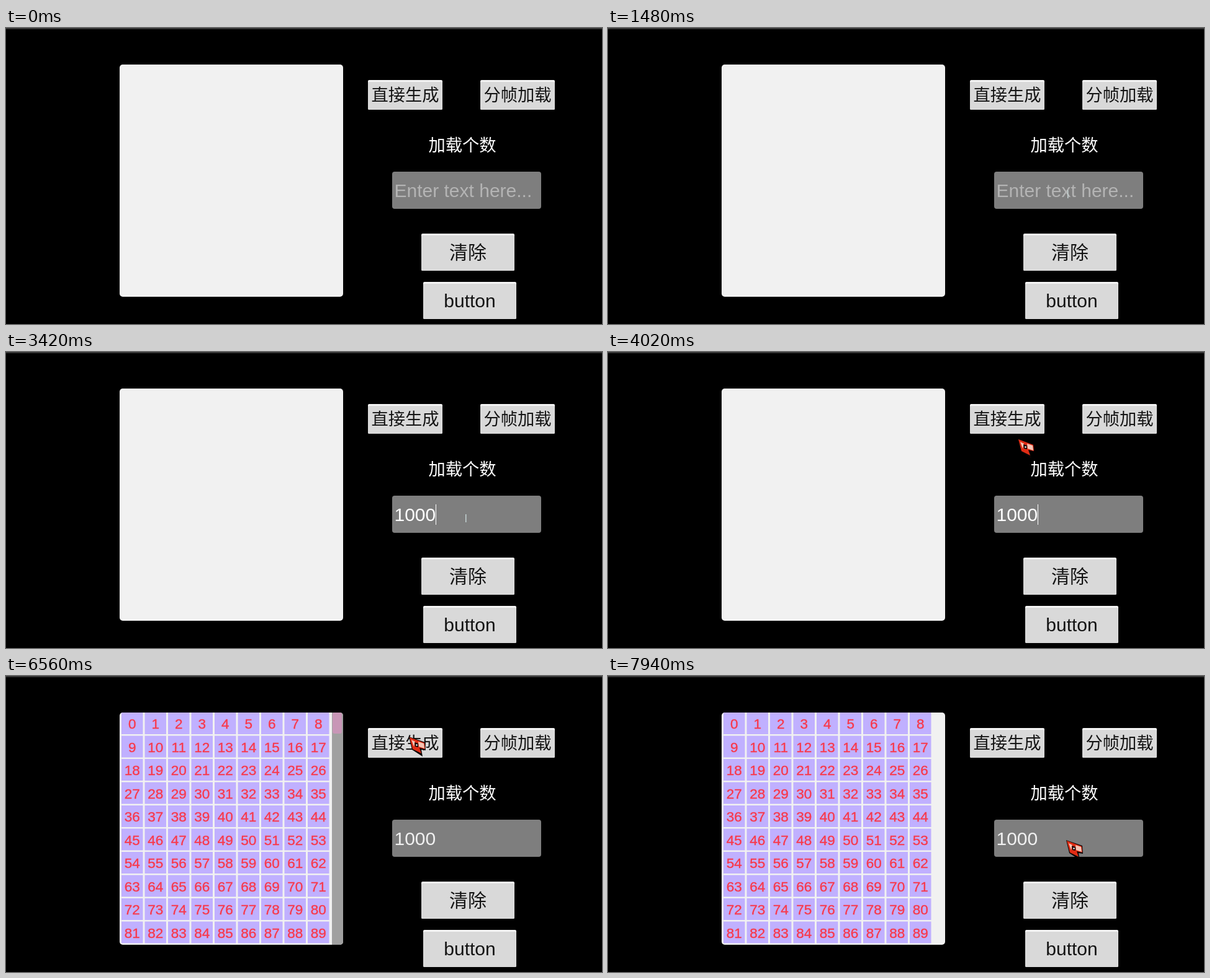
Animation of 960 by 478 pixels, one loop 8000 ms. Source, as an HTML page:

```html
<!DOCTYPE html>
<html lang="zh">
<head>
<meta charset="utf-8">
<title>List loading</title>
<style>
  html, body { margin: 0; width: 100%; height: 100%; overflow: hidden; background: #000; }
  svg { display: block; width: 960px; height: 478px; }
  text { font: 30px "Liberation Sans", Arial, sans-serif; fill: #141414; }
  .mid { text-anchor: middle; }
  .cjk { font-family: "Noto Sans CJK SC", "Noto Sans CJK", sans-serif; }
  .face { fill: #d9d9d9; }
  .shine { fill: #f4f4f4; }
  .pressed .face { fill: #505050; }
  .pressed .shine { fill: #5a5a5a; }
  .pressed text { fill: #0c0c0c; }
  #grid rect { fill: #c0b0ff; }
  #grid text { font-size: 22.5px; fill: #f83a4c; stroke: #f83a4c; stroke-width: .4px; }
</style>
</head>
<body>
<svg viewBox="0 0 960 478">
  <defs>
    <clipPath id="round"><rect x="183" y="59" width="360" height="375" rx="5"/></clipPath>
  </defs>
  <rect width="960" height="478"/>
  <rect width="960" height="2" fill="#343434"/>

  <g clip-path="url(#round)">
    <rect x="183" y="59" width="360" height="375" fill="#f1f1f1"/>
    <g id="grid"></g>
    <g id="bar">
      <rect x="525" y="59" width="18" height="375" fill="#a0a0a0"/>
      <rect x="526" y="59" width="15" height="34" rx="3" fill="#c896b6"/>
    </g>
  </g>

  <g id="buttons"></g>
  <text class="mid cjk" x="735" y="199" style="fill:#fff;font-size:27.3px">加载个数</text>

  <rect x="622" y="232" width="240" height="60" rx="4" fill="#7e7e7e"/>
  <text id="value" x="625.5" y="272.5"></text>
  <rect id="caret" y="246" width="1" height="33" fill="#fff"/>
  <rect id="beam" x="740" y="262" width="1.5" height="13" fill="#c4d2d2"/>

  <g id="cursor">
    <path d="M0 0L26 9L27 22L20 21L22 32L5 21Z" fill="#080404"/>
    <path d="M1 1L25 10L26 20L17 18L20 27L6 20Z" fill="#e02c14"/>
    <path d="M4 5L10 8L8 16Z M15 8L24 11L25 19L16 16Z" fill="#f6c4b4"/>
    <path d="M9 9L15 11L15 17L10 16Z" fill="#140808"/>
    <circle cx="12.5" cy="13.5" r="1.3" fill="#fff"/>
  </g>
</svg>
<script>
const LOOP = 8000;
const TICK = 68;
const FOCUS = 950, LEAVE = 3960, PRESS = 4490, FILL = 6560;
const BLINK = 533;
const SVG = "http://www.w3.org/2000/svg";
const $ = id => document.getElementById(id);

function add(parent, tag, attrs, label = "") {
  const node = document.createElementNS(SVG, tag);
  for (const key in attrs) node.setAttribute(key, attrs[key]);
  node.textContent = label;
  return parent.appendChild(node);
}

function button(x, y, width, height, label, size, font = "cjk") {
  const g = add($("buttons"), "g", {});
  add(g, "rect", { x, y, width, height, rx: 2, class: "shine" });
  add(g, "rect", { x, y: y + 3, width, height: height - 3, rx: 2, class: "face" });
  add(g, "text", {
    x: x + width / 2, y: y + height / 2 + size * .36,
    class: "mid " + font, style: `font-size:${size}px`
  }, label);
  return g;
}

const generate = button(583, 84, 120, 48, "直接生成", 27.3);
button(764, 84, 120, 48, "分帧加载", 27.3);
button(669, 332, 150, 60, "清除", 30);
button(672, 410, 150, 60, "button", 30, "latin");

for (let i = 0; i < 90; i++) {
  const x = 186 + i % 9 * 37.5, y = 59 + Math.floor(i / 9) * 37.5;
  add($("grid"), "rect", { x, y, width: 34.5, height: 35 });
  add($("grid"), "text", { x: x + 17.3, y: y + 26, class: "mid" }, i);
}

const moves = [
  { start: 130, end: 880, from: [940, 512], to: [740, 266] },
  { start: LEAVE, end: 4290, from: [667, 165], to: [649, 98] },
  { start: 7260, end: 7940, from: [649, 98], to: [738, 265] }
];

// Time of each key press and the text it leaves
const typing = [[1680, "1"], [2360, "100"], [3020, "1000"]];

const within = (t, a, b) => t >= a && t < b;
const show = (id, on) => $(id).style.display = on ? "" : "none";
const easeOut = p => 1 - (1 - p) ** 2;
const progress = (t, a, b) => Math.min(1, Math.max(0, (t - a) / (b - a)));

function pointer(t) {
  const move = moves.findLast(m => t >= m.start);
  const typingNow = within(t, FOCUS, LEAVE);
  show("cursor", move && !typingNow);
  show("beam", typingNow);
  if (!move) return;
  const { start, end, from, to } = move;
  // The pointer is redrawn once per tick; the final pose is always reached
  const held = t >= end ? end : start + Math.floor((t - start + 8) / TICK) * TICK;
  const p = easeOut(progress(held, start, end));
  const [x, y] = from.map((v, i) => Math.round(v + (to[i] - v) * p));
  $("cursor").setAttribute("transform", `translate(${x} ${y})`);
}

function input(t) {
  const typed = typing.reduce((s, [at, v]) => t >= at ? v : s, "");
  const lit = Math.floor((PRESS - t) / BLINK) % 2 === 0;
  $("value").textContent = typed || "Enter text here...";
  $("value").style.fill = !typed ? "#b4b4b4" : t < PRESS ? "#fff" : "#f0f0f0";
  show("caret", within(t, FOCUS, PRESS) && lit);
  $("caret").setAttribute("x", Math.round(625 + typed.length * 16.68));
}

function draw(t) {
  pointer(t);
  input(t);
  generate.classList.toggle("pressed", within(t, PRESS, FILL));
  show("grid", t >= FILL);
  show("bar", t >= FILL);
  $("bar").style.opacity = 1 - easeOut(progress(t, FILL + 40, FILL + 390));
}

let origin;
function tick(now) {
  origin ??= now;
  draw((now - origin) % LOOP);
  requestAnimationFrame(tick);
}
draw(0);
requestAnimationFrame(tick);
</script>
</body>
</html>
```
